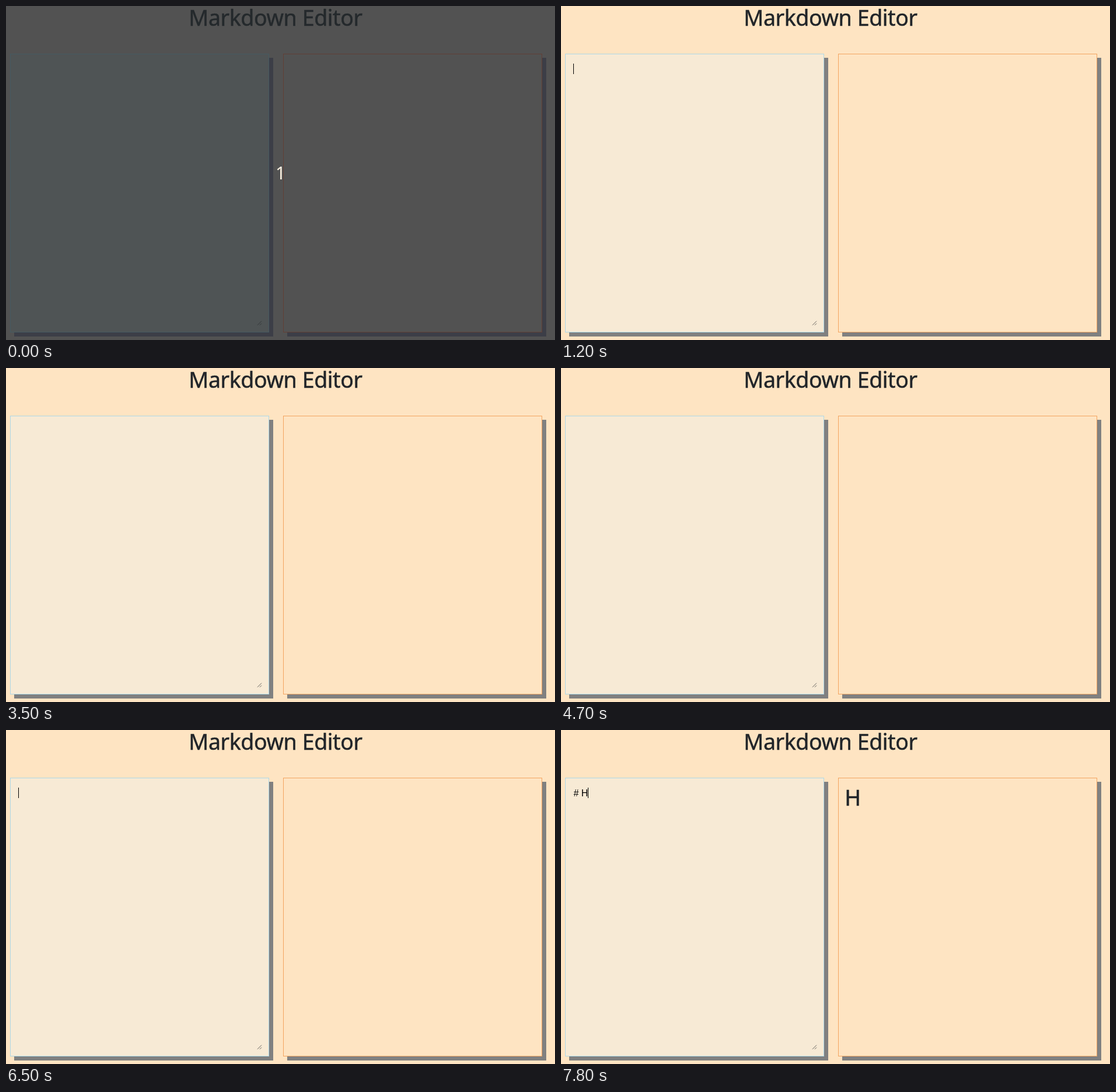
Write an HTML page that moves like this. It is 941x574 px and loops after 8 s.

```html
<!DOCTYPE html>
<html lang="en">
<head>
<meta charset="utf-8">
<title>Markdown Editor</title>
<style>
  html, body { margin: 0; width: 100%; height: 100%; overflow: hidden; }
  svg {
    display: block;
    --page: #fee4c2; --input: #f7ead5; --shadow: #808080;
    --inputEdge: #add8e6; --previewEdge: #f4a460;
    --ink: #212529; --grip: #62605c;
  }
  svg.loading {
    --page: #525252; --input: #4f5455; --shadow: #3c3e47;
    --inputEdge: #455a62; --previewEdge: #613f35;
    --ink: #24292c; --grip: #34383a;
  }
  .page { fill: var(--page); }
  .shadow { fill: var(--shadow); }
  .input { fill: var(--input); stroke: var(--inputEdge); }
  .preview { fill: var(--page); stroke: var(--previewEdge); }
  .grip { fill: none; stroke: var(--grip); }
  text { font-family: "Noto Sans", "Open Sans", sans-serif; fill: var(--ink); white-space: pre; }
  .heading { font-size: 37.5px; font-weight: 500; letter-spacing: -.4px; stroke: var(--ink); stroke-width: .5px; }
  .paragraph { font-size: 16px; }
  .typed { font: 16px "Liberation Sans", Arial, sans-serif; fill: #000; }
  .counter { font-size: 30px; fill: #fdf3e2; visibility: hidden; }
  .loading .counter { visibility: visible; }
</style>
</head>
<body>
<svg id="stage" width="941" height="574" viewBox="0 0 941 574">
  <rect class="page" width="941" height="574"/>
  <text class="heading" x="462" y="34" text-anchor="middle">Markdown Editor</text>
  <text class="counter" x="462" y="298">1</text>
  <rect class="shadow" x="14" y="89" width="444" height="479"/>
  <rect class="input" x="7.5" y="82.5" width="443" height="478"/>
  <path class="grip" d="M431 548.5l7-7M435 548.5l3-3"/>
  <rect class="shadow" x="482" y="89" width="444" height="479"/>
  <rect class="preview" x="475.5" y="82.5" width="443" height="478"/>
  <text class="typed" id="typed" x="21.5" y="114"></text>
  <rect id="caret" y="99" width="1" height="18"/>
  <text class="paragraph" id="paragraph" x="487" y="110"></text>
  <text class="heading" id="heading" x="486.3" y="130"></text>
</svg>
<script>
  const LOOP = 8000;
  const $ = id => document.getElementById(id);
  const caretX = { "": 21, "H": 33, "#": 31, "# ": 35, "# H": 46 };

  // [start ms, typed text, caret visible]
  const steps = [
    [0, "", false], [1200, "", true], [2300, "", false], [2900, "", true],
    [3500, "", false], [4100, "H", true], [4600, "", true], [4700, "", false],
    [5300, "", true], [5900, "", false], [6500, "", true],
    [7000, "#", true], [7400, "# ", true], [7800, "# H", true]
  ];

  function render(time) {
    const [, text, caretOn] = steps.findLast(([start]) => time >= start);
    const isHeading = text.startsWith("#");
    $("stage").classList.toggle("loading", time < 100);
    $("typed").textContent = text;
    $("caret").setAttribute("x", caretX[text]);
    $("caret").setAttribute("visibility", caretOn ? "visible" : "hidden");
    $("paragraph").textContent = isHeading ? "" : text;
    $("heading").textContent = isHeading ? text.slice(2) : "";
  }

  const origin = performance.now();
  function tick() {
    render((performance.now() - origin) % LOOP);
    requestAnimationFrame(tick);
  }
  tick();
</script>
</body>
</html>
```
